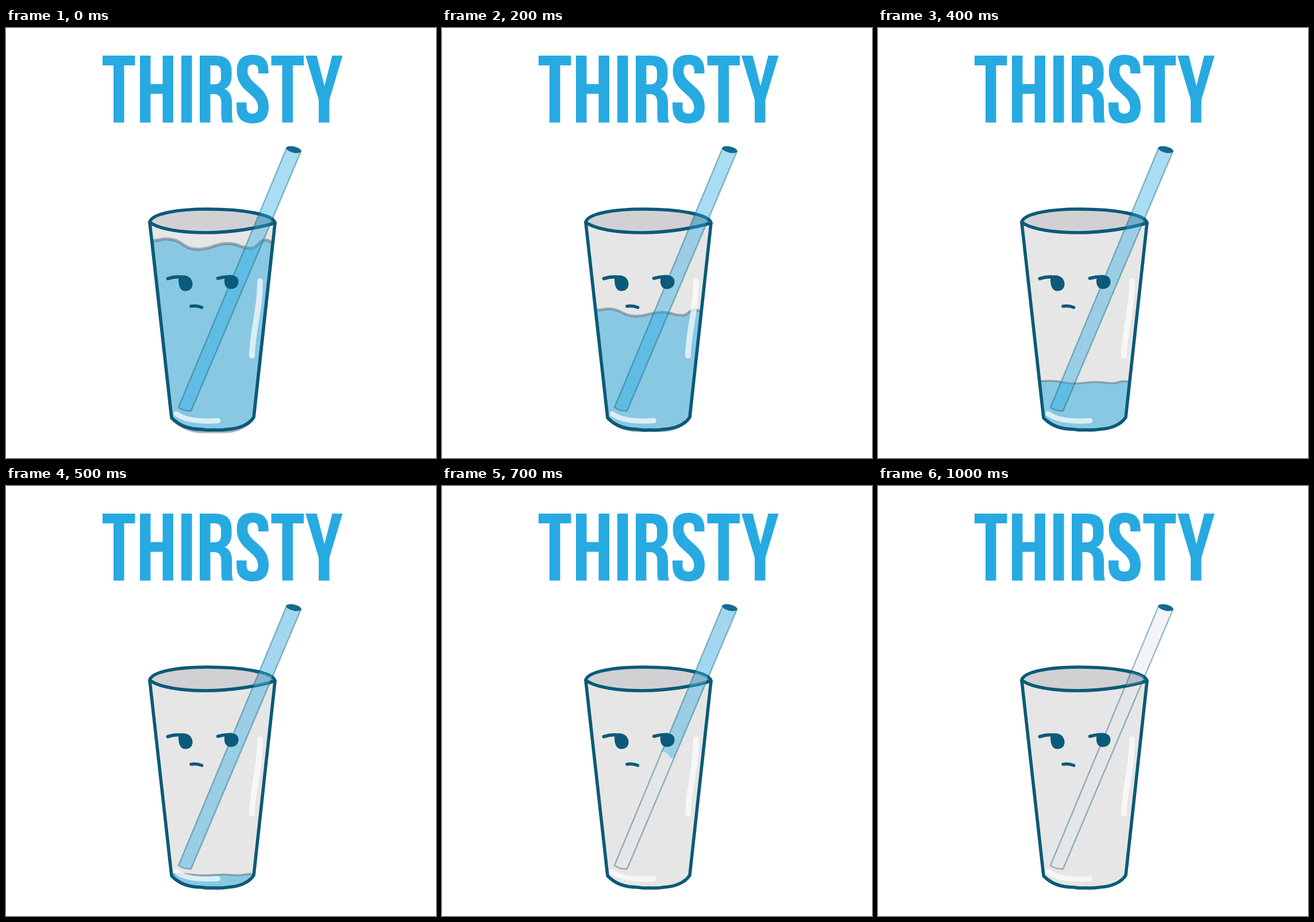
Write an HTML page that moves like this. It is 748 px wide and 748 px high and loops after 2 s.

```html
<!DOCTYPE html>
<html lang="en">
<head>
<meta charset="utf-8">
<title>Thirsty</title>
<style>
  html, body { margin: 0; width: 100%; height: 100%; overflow: hidden; background: #fff; }
  svg { display: block; width: 100%; height: 100%; }
  h1 { position: absolute; width: 1px; height: 1px; margin: 0; overflow: hidden; clip-path: inset(50%); font-family: Roboto, sans-serif; }
  .line { fill: none; stroke: #0b5a79; stroke-width: 5.6; stroke-linecap: round; stroke-linejoin: round; }
  .shine { fill: none; stroke: #fff; stroke-opacity: .7; stroke-linecap: round; }
  .ink { fill: #0b5a79; }
</style>
</head>
<body>
<h1>THIRSTY</h1>
<svg viewBox="0 0 748 748" aria-hidden="true">
  <defs>
    <path id="straw" d="M488 209 L300 660 Q310 667 322 666 L513 215 Z"/>
    <path id="rim" d="M250 338 C253 322 302 315 350 315 C410 315 465 324 468 339 C440 348 390 356 350 356 C304 356 266 350 250 338 Z"/>
    <path id="body" d="M250 338 L288 678 C300 691 318 698 340 698 Q350 700 360 699 Q374 700 386 698 C405 697 423 690 431 677 L468 339"/>
    <clipPath id="inRim"><use href="#rim"/></clipPath>
  </defs>

  <!-- lettering -->
  <g fill="#27aae1" fill-rule="evenodd">
    <path id="tee" d="M168 48 H224.5 V65 H205.500 V164.500 H187 V65 H168 Z"/>
    <path d="M233 48 H251.500 V97.500 H272.500 V48 H291 V164.500 H272.500 V114.500 H251.500 V164.500 H233 Z"/>
    <path d="M305 48 H323.500 V164.500 H305 Z"/>
    <path d="M337 48 H364.500 Q392.500 48 392.500 75 V82 Q392.500 101 380 106 Q393 111 393 130 V148 Q393 159 395 164.500 H376.500 Q374.500 160 374.500 148 V130 Q374.500 115 362 115 H355.500 V164.500 H337 Z M355.500 65 V98 H362.500 Q374 98 374 86 V77 Q374 65 364 65 Z"/>
    <path d="M429 46.500 Q456.500 46.500 456.500 75 V79 H439 V74 Q439 63.500 429.500 63.500 Q420 63.500 420 74 C420 98 457 101 457 137 Q457 166 429 166 Q401 166 401 137 V129.500 H418.500 V138 Q418.500 149 428.500 149 Q438.500 149 438.500 138 C438.500 114 401.500 111 401.500 75 Q401.500 46.500 429 46.500 Z"/>
    <use href="#tee" x="293.500"/>
    <path d="M521 48 H540.500 L554 101 L567.500 48 H585.500 L562.500 125 V164.500 H544 V125 Z"/>
  </g>

  <use id="sheen" href="#straw" fill="#f4f4f8"/>
  <use href="#body" fill="#e6e6e6"/>
  <path id="water" fill="#88c8e3" stroke="#5a6e7d" stroke-opacity=".5"/>
  <use href="#rim" fill="#d1d1d4"/>
  <use href="#body" class="line"/>
  <use href="#rim" class="line"/>
  <path class="shine" stroke-width="10" d="M442 440.500 C442 492 428 530 428 570"/>
  <path class="shine" stroke-width="9" d="M296 671 C312 683 340 685 368.500 683"/>

  <path id="liquid" fill="#27aae1" fill-opacity=".4"/>
  <g clip-path="url(#inRim)"><use id="tint" href="#straw"/></g>
  <use href="#straw" fill="none" stroke="#0b5a79" stroke-opacity=".4" stroke-width="2.500"/>
  <ellipse cx="500.500" cy="211.500" rx="13.500" ry="5.300" transform="rotate(13 500.5 211.5)" fill="#156990"/>

  <!-- face -->
  <path class="line" d="M281.500 436 Q294 431.500 308 433.500 M368.500 435.500 Q380 432 392 432.500 M322 484 Q332 482.500 340.500 486"/>
  <path class="ink" d="M301 432 C313 427 324.500 434 324.500 446 C324.500 453 319 457.500 312 457.500 C304 457.500 300 450 300 437 Z"/>
  <path class="ink" d="M381 431 C396 427 405 433 404.500 442 C404 450 398 454 391 454 C383 454 379 447 380 437 Z"/>
</svg>
<script>
  const $ = id => document.getElementById(id);
  const LOOP = 2000, STEP = 100;

  // water: [level, wave height, bottom sag]
  const WATER = [[376, 1, 4], [428.500, .85, 3], [495, .7, 2.500], [557, .45, 1.500], [616, .25, 0], [676, .15, 0]];
  // end of the liquid in the straw: [left y, slope across], from 600 ms
  const SIP = [[575, 12], [462, 12], [347, -3], [230, 8]];
  // surface shape: [fraction of width, offset]
  const WAVE = [[0, -6], [.12, -9], [.38, 9], [.63, -1], [.82, 7], [.94, -7], [1, -3.500]];

  const glassLeft = y => 250 + (y - 338) * 38 / 340;
  const glassRight = y => 468 - (y - 339) * 37 / 338;
  const strawLeft = y => 488 - (y - 209) * 188 / 451;
  const strawRight = y => 513 - (y - 215) * 191 / 451;

  function waterPath([level, height, sag]) {
    const left = glassLeft(level), width = glassRight(level) - left;
    const points = WAVE.map(([u, dy]) => [left + u * width, level + dy * height]);
    let d = `M${points[0]}`;
    for (let i = 1; i < points.length; i++) {
      const [x0, y0] = points[i - 1], [x1, y1] = points[i], mid = (x0 + x1) / 2;
      d += ` C${mid} ${y0} ${mid} ${y1} ${x1} ${y1}`;
    }
    const base = 698 + sag;
    return d + ` L431 677 C423 690 405 ${base} 380 ${base} H340 C318 ${base} 300 691 288 678 Z`;
  }

  function liquidPath([y, slope]) {
    const end = y + slope, xl = strawLeft(y), xr = strawRight(end), mid = (xl + xr) / 2;
    return `M488 209 L${xl} ${y} C${mid + 2} ${y} ${mid} ${end} ${xr} ${end} L513 215 Z`;
  }

  function show(step) {
    const water = WATER[step], sip = SIP[step - 6], drained = step >= 5;
    $('water').setAttribute('d', water ? waterPath(water) : '');
    $('water').setAttribute('stroke-width', water ? 3 + 2.500 * water[1] : 0);
    $('liquid').setAttribute('d', water ? $('straw').getAttribute('d') : sip ? liquidPath(sip) : '');
    $('sheen').setAttribute('visibility', drained ? 'visible' : 'hidden');
    $('tint').setAttribute('fill', drained ? 'rgba(130,165,185,.4)' : 'rgba(11,92,125,.2)');
  }

  const start = performance.now();
  let shown = -1;
  function tick() {
    const step = Math.min(10, Math.floor((performance.now() - start) % LOOP / STEP));
    if (step !== shown) show(shown = step);
    requestAnimationFrame(tick);
  }
  tick();
</script>
</body>
</html>
```
